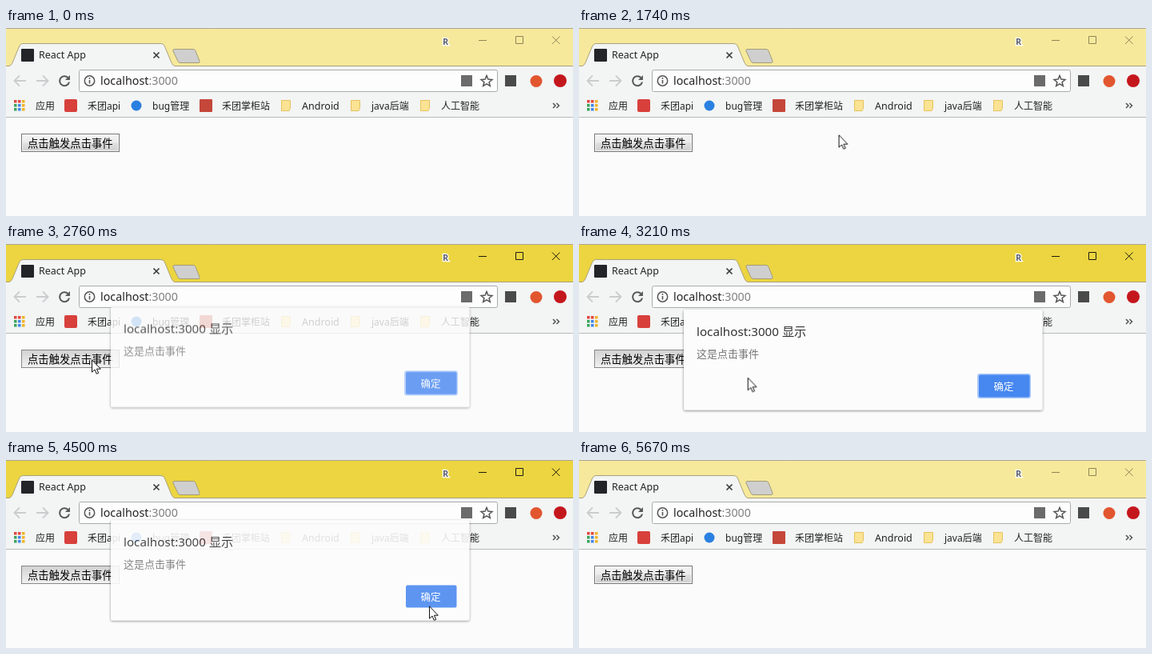
An HTML page for the animation above (5.73 s loop, 709 by 235 pixels).

```html
<!DOCTYPE html>
<html lang="zh-CN">
<head>
<meta charset="utf-8">
<title>React App</title>
<style>
html, body { margin: 0; width: 100%; height: 100%; overflow: hidden; background: #fbfbfb; }
svg { display: block; width: 709px; height: 235px; }
text { font: 12px "Noto Sans", "Noto Sans CJK SC", "Noto Sans CJK", sans-serif; fill: #222; white-space: pre; }
.line { fill: none; stroke: currentColor; }

/* One loop is 5730 ms: 1% = 57.3 ms */
.title, .hover, .down, .ring { animation: 5730ms step-end infinite; }
.title { fill: #f7e99b; color: #8d8557; animation-name: focus; }
.hover { opacity: 0; animation-name: hover; }
.down { opacity: 0; animation-name: down; }
.ring { animation-name: ring; }
.glow { opacity: 0; fill: #e4e5e5; animation: 5730ms linear infinite; }
.g1 { animation-name: g1; }
.g2 { animation-name: g2; }
.g3 { animation-name: g3; }
.dialog { opacity: 0; animation: dialog 5730ms linear infinite; }
.px { animation: px 5730ms linear infinite; }
.py { animation: py 5730ms linear infinite; }

@keyframes focus {
  0%, 98.95% { fill: #f7e99b; color: #8d8557; }
  44.5% { fill: #ecd540; color: #1c1a10; }
}
@keyframes hover { 0%, 44.5% { opacity: 0; } 37.5% { opacity: 1; } }
@keyframes down { 0%, 80.6% { opacity: 0; } 44.5% { opacity: 1; } }
@keyframes ring { 0% { opacity: 1; } 75.9% { opacity: 0; } }
@keyframes g1 { 0%, 13.9%, 18%, 100% { opacity: 0; } 14.3%, 15.6% { opacity: 1; } }
@keyframes g2 { 0%, 15.5%, 20.4%, 100% { opacity: 0; } 16%, 17.9% { opacity: 1; } }
@keyframes g3 { 0%, 17.8%, 20.6%, 100% { opacity: 0; } 18.3%, 19.4% { opacity: 1; } }
@keyframes dialog {
  0%, 45.55% { opacity: 0; transform: translateY(-19px); animation-timing-function: ease-out; }
  49.74%, 76.96% { opacity: 1; transform: none; }
  78.53% { opacity: .88; transform: translateY(-7px); }
  81.15%, 100% { opacity: 0; transform: translateY(-19px); }
}
/* The curves are quadratics, so speed carries over between stretches */
@keyframes px {
  0%, 9.948% { transform: translateX(709px); animation-timing-function: cubic-bezier(.333, 0, .667, .333); }
  20.419% { transform: translateX(594px); animation-timing-function: cubic-bezier(.333, .233, .667, .567); }
  30.89% { transform: translateX(306px); animation-timing-function: cubic-bezier(.333, .667, .667, 1); }
  41.361% { transform: translateX(107px); }
  51.832% { transform: translateX(107px); animation-timing-function: cubic-bezier(.333, 0, .667, .333); }
  54.45% { transform: translateX(140px); animation-timing-function: cubic-bezier(.333, .45, .667, .783); }
  64.921% { transform: translateX(503px); animation-timing-function: cubic-bezier(.333, .667, .667, 1); }
  70.157% { transform: translateX(529px); }
  79.058% { transform: translateX(529px); animation-timing-function: cubic-bezier(.333, .267, .667, .6); }
  85.864% { transform: translateX(634px); }
  90.052%, 100% { transform: translateX(710px); }
}
@keyframes py {
  0%, 9.948% { transform: translateY(49px); animation-timing-function: cubic-bezier(.333, 0, .667, .333); }
  20.419% { transform: translateY(84px); animation-timing-function: cubic-bezier(.333, .667, .667, 1); }
  30.89% { transform: translateY(133px); animation-timing-function: cubic-bezier(.333, .667, .667, 1); }
  41.361% { transform: translateY(144px); }
  51.832% { transform: translateY(144px); animation-timing-function: cubic-bezier(.333, 0, .667, .333); }
  54.45% { transform: translateY(157px); animation-timing-function: cubic-bezier(.333, .667, .667, 1); }
  64.921% { transform: translateY(191px); animation-timing-function: cubic-bezier(.333, .667, .667, 1); }
  70.157%, 79.058% { transform: translateY(182px); }
  85.864% { transform: translateY(175px); }
  90.052%, 100% { transform: translateY(165px); }
}
</style>
</head>
<body>
<svg viewBox="0 0 709 235">
  <defs>
    <linearGradient id="up" x2="0" y2="1">
      <stop stop-color="#f4f4f4"/><stop offset=".48" stop-color="#ebebeb"/>
      <stop offset=".52" stop-color="#dfdfdf"/><stop offset="1" stop-color="#d0d0d0"/>
    </linearGradient>
    <linearGradient id="over" x2="0" y2="1">
      <stop stop-color="#fafafa"/><stop offset="1" stop-color="#dcdcdc"/>
    </linearGradient>
    <linearGradient id="press" x2="0" y2="1">
      <stop stop-color="#d2d2d2"/><stop offset="1" stop-color="#f1f1f1"/>
    </linearGradient>
    <filter id="shade" x="-5%" y="-10%" width="110%" height="125%">
      <feDropShadow dx="0" dy="1" stdDeviation="1.6" flood-opacity=".5"/>
    </filter>
    <path id="folder" d="M.5 .5H11.5V10L10 13.5H.5Z" fill="#fbe394" stroke="#e6c25c"/>
  </defs>

  <rect width="709" height="235" fill="#fbfbfb"/>

  <!-- Window frame -->
  <g class="title">
    <rect width="709" height="48"/>
    <path class="line" d="M591 15.5H601M637.5 10.5H646.5V19.5H637.5ZM683 10.5L692.5 20M692.5 10.5L683 20"/>
  </g>
  <path d="M0 .5H709" stroke="#a9a695"/>
  <text x="546" y="21" style="font-size:11px;font-weight:700;fill:#5d6070;stroke:#fff;stroke-width:2.5px;paint-order:stroke">R</text>
  <path d="M211 26.5H234Q236 26.5 237 28.500L242 41Q243 43.500 240 43.500H218Q216 43.500 215 41.500L209 29Q208 26.500 211 26.500Z" fill="#cfcfcf" stroke="#a39c79"/>

  <!-- Tab and toolbar -->
  <rect y="48" width="709" height="63" fill="#f3f4f4"/>
  <path d="M0 47.500H4Q6.500 47 8 43.500L16.500 23Q18 19.500 21 19.500H194Q197 19.500 198.500 23L207 43.500Q208.500 47 211 47.500H709V49H0Z" fill="#f3f4f4"/>
  <path d="M0 47.500H4Q6.500 47 8 43.500L16.500 23Q18 19.500 21 19.500H194Q197 19.500 198.500 23L207 43.500Q208.500 47 211 47.500H709" fill="none" stroke="#aaa27a"/>
  <path d="M0 111.500H709" stroke="#b9babb"/>
  <rect x="19" y="26" width="16" height="16" rx="1" fill="#222428"/>
  <text x="41" y="38" style="font-size:12.5px">React App</text>
  <path d="M184.500 30.500L191.500 37.500M191.500 30.500L184.500 37.500" stroke="#3c3c3c" stroke-width="1.7"/>

  <path d="M25 66H11M17 59.500L10.500 66L17 72.500M38 66H52M46 59.500L52.500 66L46 72.500" fill="none" stroke="#cbcccd" stroke-width="1.8"/>
  <path d="M77.500 62A6 6 0 1 0 79 67.500" fill="none" stroke="#5a5a5a" stroke-width="2"/>
  <path d="M80 59V65H74Z" fill="#5a5a5a"/>

  <rect x="91.500" y="52.500" width="523" height="27" rx="2" fill="#fdfdfd" stroke="#a9abac"/>
  <circle cx="104.500" cy="66" r="6.200" fill="none" stroke="#555" stroke-width="1.500"/>
  <path d="M104.500 65V69.500M104.500 62V63.700" stroke="#555" stroke-width="1.600"/>
  <text x="118" y="71" style="font-size:14.3px">localhost<tspan fill="#808080">:3000</tspan></text>
  <rect x="569" y="59" width="14" height="14" fill="#6b6b6b"/>
  <path d="M601 59.500L602.900 64.100 607.900 64.500 604.100 67.700 605.300 72.500 601 69.900 596.700 72.500 597.900 67.700 594.100 64.500 599.100 64.100Z" fill="none" stroke="#555" stroke-width="1.500"/>

  <rect class="glow g1" x="681" y="54" width="25" height="25" rx="2"/>
  <rect class="glow g2" x="650" y="54" width="25" height="25" rx="2"/>
  <rect class="glow g3" x="618" y="54" width="25" height="25" rx="2"/>
  <rect x="624" y="59" width="14" height="14" fill="#4a4a4a"/>
  <circle cx="663" cy="66.500" r="7.500" fill="#e2562f"/>
  <circle cx="693" cy="66" r="8" fill="#c4171d"/>

  <!-- Bookmarks -->
  <g id="apps"></g>
  <text x="37" y="102">应用</text>
  <rect x="73" y="89" width="16" height="16" rx="2" fill="#d8403c"/>
  <text x="102" y="102">禾团api</text>
  <circle cx="163" cy="97" r="6.500" fill="#2a80e0"/>
  <text x="183" y="102">bug管理</text>
  <rect x="242" y="89" width="16" height="16" rx="1" fill="#c4473a"/>
  <text x="270" y="102">禾团掌柜站</text>
  <use href="#folder" x="344" y="90"/>
  <text x="370" y="102" style="font-size:12.5px">Android</text>
  <use href="#folder" x="431" y="90"/>
  <text x="457" y="102">java后端</text>
  <use href="#folder" x="518" y="90"/>
  <text x="544" y="102">人工智能</text>
  <path d="M684 94L687 97L684 100M688.500 94L691.500 97L688.500 100" fill="none" stroke="#555" stroke-width="1.500"/>

  <!-- Page button -->
  <rect x="19.500" y="132.500" width="122" height="22" fill="url(#up)" stroke="#777"/>
  <rect x="20.500" y="133.500" width="120" height="20" fill="none" stroke="#fafafa" stroke-opacity=".8"/>
  <rect class="hover" x="19.500" y="132.500" width="122" height="22" fill="url(#over)" stroke="#777"/>
  <rect class="down" x="19.500" y="132.500" width="122" height="22" fill="url(#press)" stroke="#888"/>
  <text x="27" y="148.500" style="font-size:13.33px;fill:#000">点击触发点击事件</text>

  <!-- Alert -->
  <g class="dialog">
    <rect x="131" y="82" width="448.500" height="125.500" rx="2" fill="#fcfcfc" filter="url(#shade)"/>
    <text x="147" y="115" style="font-size:15.2px;fill:#333">localhost:3000 显示</text>
    <text x="147" y="142" style="font-size:13px;fill:#777">这是点击事件</text>
    <rect class="ring" x="498" y="162" width="67" height="31" rx="3" fill="#a9c8fa"/>
    <rect x="500" y="163.500" width="63.500" height="28" rx="2" fill="#4787f0"/>
    <text x="518.500" y="182.500" style="font-size:12.5px;font-weight:500;fill:#fff">确定</text>
  </g>

  <!-- Pointer -->
  <g class="px"><g class="py">
    <path d="M.5 .8V16.200L4 13 6.300 18.300 8.700 17.300 6.400 12.200H11.300Z" fill="#fff" stroke="#111"/>
  </g></g>
</svg>
<script>
const LOOP = 5730, STEP = 30;

const colors = ['#e0483e', '#e0483e', '#f0b429', '#3ba55c', '#4285e8', '#f0b429', '#3ba55c', '#4285e8', '#f0b429'];
document.getElementById('apps').innerHTML = colors.map((c, i) =>
  `<rect x="${10 + i % 3 * 5}" y="${90 + Math.floor(i / 3) * 5}" width="3.5" height="3.5" fill="${c}"/>`).join('');

// Advance all keyframes together in 30 ms ticks, like a screen capture
const anims = document.getAnimations();
const start = performance.now();
anims.forEach(a => a.pause());

function draw() {
  const t = (performance.now() - start) % LOOP;
  const tick = Math.floor(t / STEP) * STEP;
  anims.forEach(a => { a.currentTime = tick; });
  requestAnimationFrame(draw);
}
draw();
</script>
</body>
</html>
```
